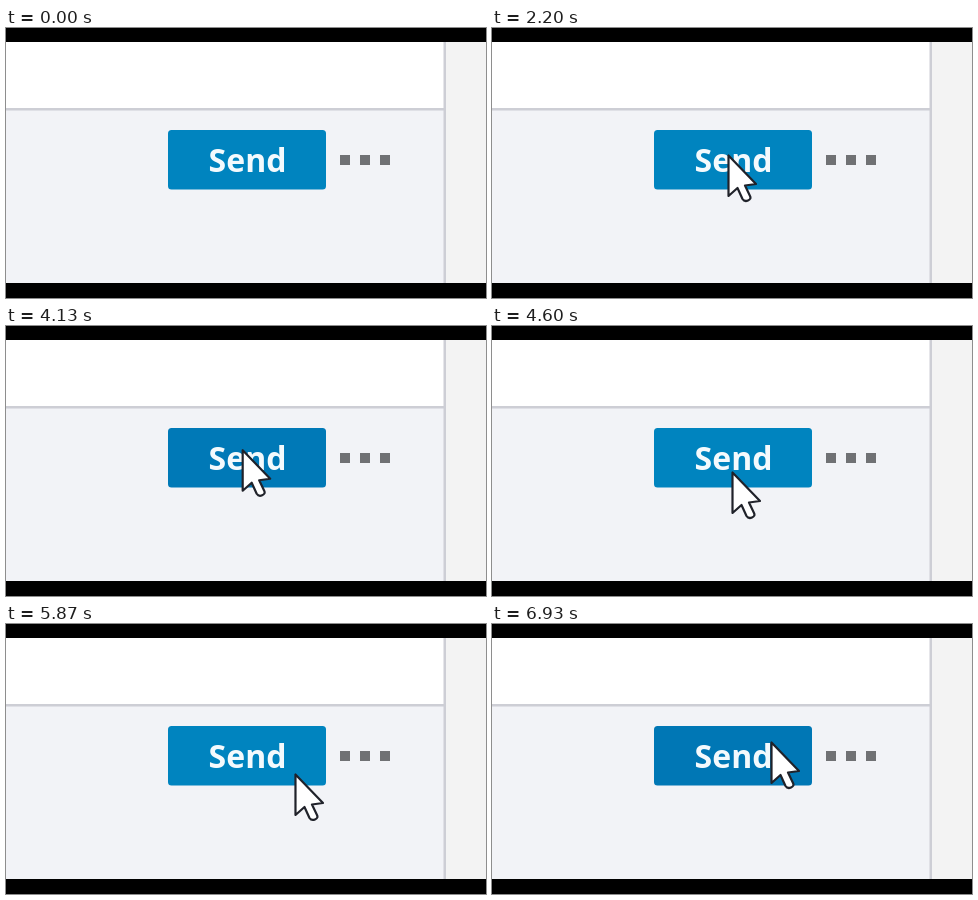
An HTML page that plays this animation: 480 px wide and 270 px high, repeating every 6.99 s.

```html
<!DOCTYPE html>
<html lang="en">
<head>
<meta charset="utf-8">
<title>Send button</title>
<style>
  html, body { margin: 0; width: 100%; height: 100%; overflow: hidden; background: #000; }
  svg { display: block; width: 100%; height: 100%; }
  text { font: 700 32px "Open Sans", "Noto Sans", sans-serif; }
  .soft { filter: blur(0.65px); }
</style>
</head>
<body>
<svg viewBox="0 0 480 270">
  <rect width="480" height="270" fill="#000"/>
  <rect y="14" width="438" height="67" fill="#fff"/>
  <rect y="81" width="438" height="174" fill="#f2f3f7"/>
  <rect x="438" y="14" width="42" height="241" fill="#f3f3f3"/>
  <rect y="80" width="438" height="2.5" fill="#cdced5"/>
  <rect x="437.5" y="14" width="2.5" height="241" fill="#cdced5"/>
  <g class="soft">
    <rect id="button" x="162" y="102" width="158" height="59.5" rx="3.5"/>
    <text x="241.5" y="144.2" text-anchor="middle" textLength="auto" fill="#f4fafd">Send</text>
    <path d="M334 127h10v10h-10zM354 127h10v10h-10zM374 127h10v10h-10z" fill="#707174"/>
    <path id="cursor" d="M.5 .5V41L9.5 33L14.5 44Q16.5 47 20 45.5T22 41L17 30.5L28 29Z"
          fill="#fff" stroke="#20222a" stroke-width="2.2" stroke-linejoin="round"/>
  </g>
</svg>
<script>
const LOOP = 6990;
const RATE = 0.015; // screen updates per ms
const APPEAR = 2000;
const FADE = 330;
const button = document.getElementById("button");
const cursor = document.getElementById("cursor");

// Pointer tip: [ms, x, y]
const stops = [
  [APPEAR, 20, 164], [2200, 236, 127], [3070, 236, 127], [3200, 235, 121],
  [4070, 236, 123], [4600, 240, 146], [4800, 243, 161], [5200, 162, 157],
  [5330, 168, 153], [5530, 203, 130], [5870, 289, 150], [6270, 285, 121], [6930, 279, 118]
];

const clamp = u => Math.min(1, Math.max(0, u));
const mix = (a, b, u) => a + (b - a) * u;

function slope(i, axis) {
  const a = stops[i], b = stops[i + 1];
  return a && b ? (b[axis] - a[axis]) / (b[0] - a[0]) : 0;
}

// Flat at turning points, so the curve never overshoots a stop
function tangent(i, axis) {
  const before = slope(i - 1, axis), after = slope(i, axis);
  return before * after > 0 ? 2 * before * after / (before + after) : 0;
}

function glide(t, axis) {
  const next = stops.findIndex(stop => stop[0] > t);
  if (next < 0) return stops[stops.length - 1][axis];
  const i = Math.max(0, next - 1);
  const a = stops[i], b = stops[i + 1];
  const span = b[0] - a[0];
  const u = clamp((t - a[0]) / span), v = 1 - u;
  return a[axis] * v * v * (1 + 2 * u) + b[axis] * u * u * (3 - 2 * u)
    + span * u * v * (tangent(i, axis) * v - tangent(i + 1, axis) * u);
}

const ramp = (t, from) => clamp((t - from) / FADE);
const hover = t => ramp(t, 3400) - ramp(t, 4070) + ramp(t, 6270);

function draw(time) {
  const t = Math.floor((time % LOOP + 5) * RATE) / RATE;
  cursor.setAttribute("visibility", t < APPEAR - 1 ? "hidden" : "visible");
  cursor.setAttribute("transform", `translate(${glide(t, 1)} ${glide(t, 2)})`);
  const u = hover(t);
  button.setAttribute("fill", `rgb(0 ${mix(132, 119, u)} ${mix(191, 181, u)})`);
}

const start = performance.now();
function tick() {
  draw(performance.now() - start);
  requestAnimationFrame(tick);
}
tick();
</script>
</body>
</html>
```
